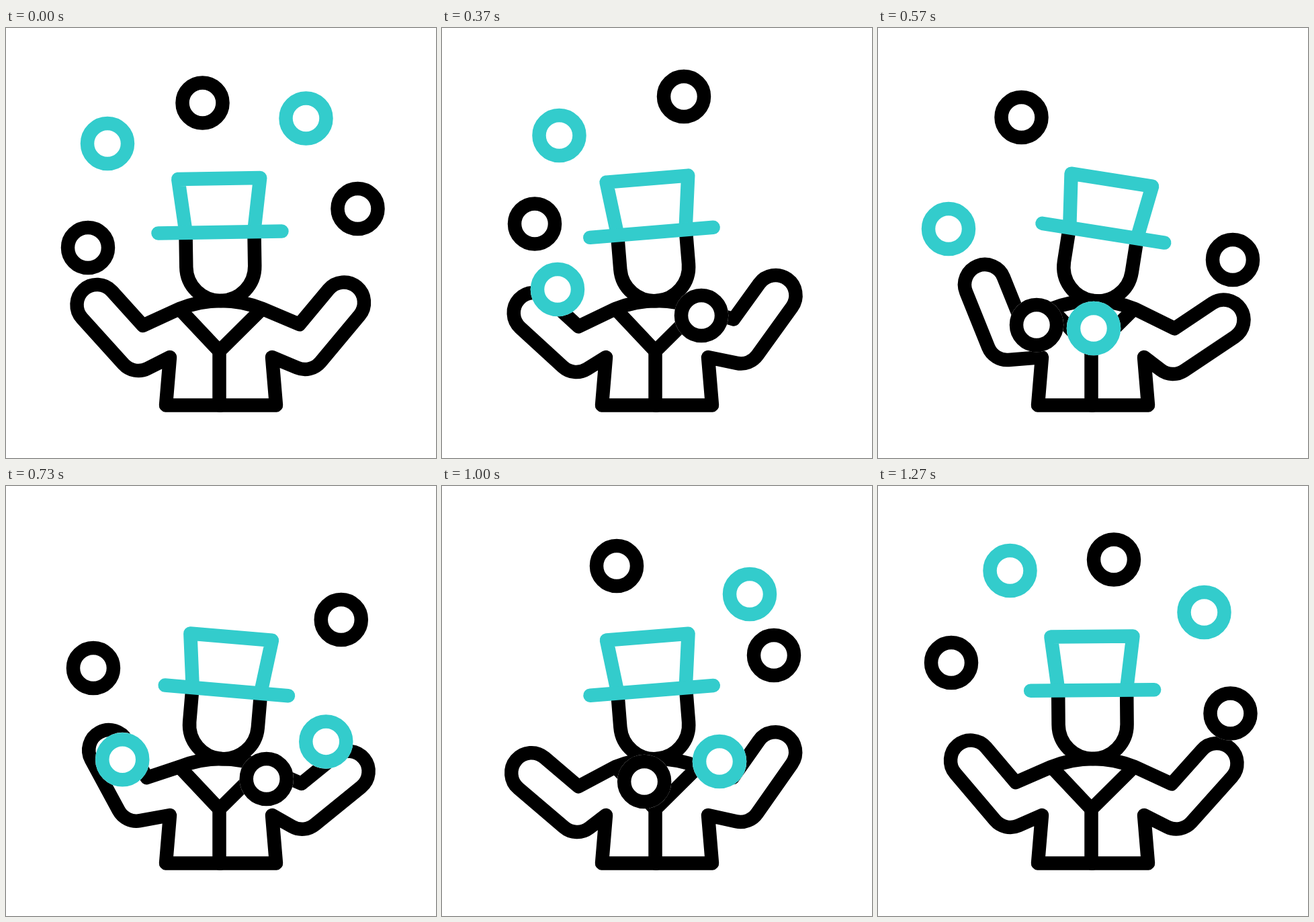
Recreate the animation shown at these times as an HTML page with a canvas. Size 640 by 640 pixels, loop 1300 ms.

```html
<!DOCTYPE html>
<html lang="en">
<head>
<meta charset="utf-8">
<title>Juggler</title>
<style>
  html, body { margin: 0; width: 100%; height: 100%; overflow: hidden; background: #fff; }
  canvas { display: block; width: 640px; height: 640px; }
</style>
</head>
<body>
<canvas id="stage" width="640" height="640"></canvas>
<script>
const ctx = document.getElementById('stage').getContext('2d');
const BLACK = '#000', TEAL = '#33cccc';
const LOOP = 1300, FPS = 30;
const PERIOD = 40.7; // motion cycle in steps; the loop cuts it a little short
const R = 30, HALF_PI = Math.PI / 2;

// Keys: [step, x, y]
const balls = [
  { color: BLACK, keys: [[0, 122, 327], [5, 220, 425], [11, 386, 428], [17, 528, 345],
    [21.5, 508, 212], [26, 383, 114], [30, 260, 119], [34, 147, 186], [38, 109, 263]] },
  { color: TEAL, keys: [[0, 151, 172], [5, 125, 266], [11, 172, 389], [17, 321, 447],
    [21.5, 464, 390], [26, 539, 282], [30, 458, 161], [34, 305, 98], [38, 196.5, 126]] },
  { color: BLACK, keys: [[0, 292.5, 111.5], [5, 190.5, 152], [11, 138, 291.5], [17, 236, 442],
    [26, 483, 365], [30, 494, 252], [34, 430, 143], [38, 351, 109.5]] },
  { color: TEAL, keys: [[0, 446.5, 134.5], [5, 320, 94.5], [11, 174.5, 160], [17, 105, 299],
    [26, 281.5, 447], [30, 413, 410], [34, 493.5, 291], [38, 485.5, 188]] },
  { color: BLACK, keys: [[0, 523.5, 269], [5, 477.5, 172], [11, 360, 102], [17, 213.5, 133],
    [21.5, 132, 257], [26, 162.5, 379], [34, 453, 434], [38, 524.5, 338.5]] }
];

// Keys: [step, handX, handY, elbowX, elbowY]; the right arm is given mirrored
const leftArm = [
  [0, 135.5, 412, 197, 480], [5, 130, 430.5, 201, 487], [7.5, 127, 439, 203, 491],
  [11, 136.7, 424, 200, 482], [17, 159, 382, 192, 464], [20, 159, 382, 192, 464],
  [26, 136.7, 424, 200, 482], [29, 131, 432, 202, 487], [34, 150.5, 392, 194, 469],
  [38, 138, 408.5, 197, 478]
];
const rightArm = [
  [0, 137, 408.5, 195, 478], [5, 145.5, 392, 195, 469], [7.5, 147.5, 388, 194, 467],
  [11, 143.5, 398, 195, 469.5], [17, 125.5, 434.5, 201, 485], [20, 125.5, 434.5, 201, 485],
  [26, 143.5, 398, 195, 469.5], [29, 146, 392, 195, 468], [34, 129, 426.5, 199, 483.5],
  [38, 135.5, 413, 196, 480.5]
];

// Keys: [step, degrees]
const headTilt = [[0, -0.9], [5, -7.2], [11, -4.7], [17, 9], [26, -1.5], [30, -4.6], [34, -3], [38, -0.5]];

// Smooth cyclic curve through the keys
function sample(keys, t) {
  const count = keys.length;
  const key = i => {
    const turn = Math.floor(i / count), k = keys[i - turn * count];
    return [k[0] + turn * PERIOD, ...k.slice(1)];
  };
  let i = count - 1;
  while (keys[i][0] > t) i--;
  const [a, b, c, d] = [key(i - 1), key(i), key(i + 1), key(i + 2)];
  const span = c[0] - b[0], s = (t - b[0]) / span;
  const slope = (p, q, r, j) => {
    const h1 = q[0] - p[0], h2 = r[0] - q[0];
    return ((q[j] - p[j]) / h1 * h2 + (r[j] - q[j]) / h2 * h1) / (h1 + h2);
  };
  return b.slice(1).map((v, k) => {
    const j = k + 1, e = s * s * (3 - 2 * s);
    return v + (c[j] - v) * e +
      span * s * (1 - s) * ((1 - s) * slope(a, b, c, j) - s * slope(b, c, d, j));
  });
}

function line(color, ...points) {
  ctx.strokeStyle = color;
  ctx.beginPath();
  points.forEach(p => ctx.lineTo(...p));
  ctx.stroke();
}

// Half of the jacket: shoulder, arm, side and hem
function drawSide([hx, hy, ex, ey]) {
  const a = Math.atan2(ey - hy, ex - hx), cos = Math.cos(a), sin = Math.sin(a);
  const cuff = [244, 490];
  const dx = cuff[0] - ex, dy = cuff[1] - ey;
  const tangent = Math.atan2(dy, dx) + Math.acos(Math.min(1, R / Math.hypot(dx, dy)));
  ctx.strokeStyle = BLACK;
  ctx.beginPath();
  ctx.moveTo(320, 406);
  ctx.quadraticCurveTo(288, 406, 258, 418);
  ctx.lineTo(ex + R * sin - 23 * cos, ey - R * cos - 23 * sin);
  ctx.arc(hx, hy, R, a - HALF_PI, a + HALF_PI, true);
  ctx.arc(ex, ey, R, a + HALF_PI, tangent, true);
  ctx.lineTo(...cuff);
  ctx.lineTo(238, 561.5);
  ctx.lineTo(320, 561.5);
  ctx.stroke();
}

function drawHead(degrees) {
  ctx.save();
  ctx.translate(320, 402);
  ctx.rotate(degrees * Math.PI / 180);
  ctx.translate(-320, -402);
  ctx.strokeStyle = BLACK;
  ctx.beginPath();
  ctx.moveTo(269, 304);
  ctx.arc(320, 355, 51, Math.PI, 0, true);
  ctx.lineTo(371, 304);
  ctx.stroke();
  line(TEAL, [269, 302], [259, 224], [381, 224], [371, 302]);
  line(TEAL, [228, 304], [412, 304]);
  ctx.restore();
}

function drawBall(color, [x, y]) {
  const disc = r => {
    ctx.beginPath();
    ctx.arc(x, y, r, 0, 2 * Math.PI);
  };
  ctx.fillStyle = '#fff';
  disc(40.3);
  ctx.fill();
  ctx.strokeStyle = color;
  disc(R);
  ctx.stroke();
}

function draw(step) {
  ctx.fillStyle = '#fff';
  ctx.fillRect(0, 0, 640, 640);
  ctx.lineWidth = 20.5;
  ctx.lineCap = ctx.lineJoin = 'round';

  drawSide(sample(leftArm, step));
  ctx.save();
  ctx.translate(640, 0);
  ctx.scale(-1, 1);
  drawSide(sample(rightArm, step));
  ctx.restore();
  line(BLACK, [260, 420], [317.5, 481], [379, 420]);
  line(BLACK, [317.5, 481], [317.5, 561.5]);

  drawHead(sample(headTilt, step)[0]);
  balls.forEach(b => drawBall(b.color, sample(b.keys, step)));
}

let shown = -1;
function tick() {
  const t = performance.now() % LOOP;
  const step = Math.floor((t + 4) * FPS / 1000) % 39;
  if (step !== shown) draw(shown = step);
  requestAnimationFrame(tick);
}
tick();
</script>
</body>
</html>
```
